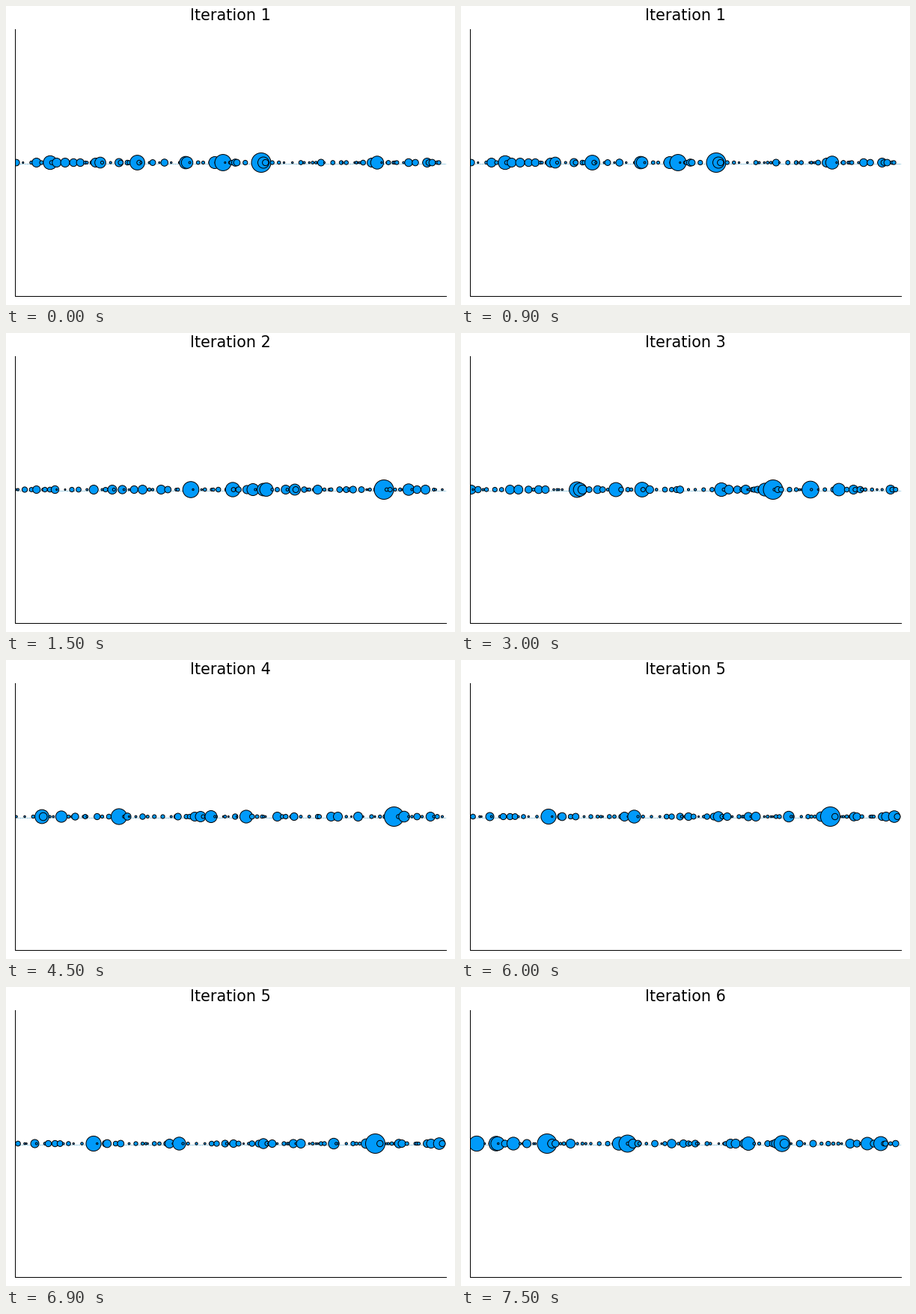
These frames come from a looping animation (600 px wide and 400 px high, 8000 ms). A matplotlib script:

```python
import random

import matplotlib.pyplot as plt
from matplotlib.animation import FuncAnimation
from matplotlib.collections import PatchCollection
from matplotlib.patches import Circle, Rectangle

W, H, DPI = 600, 400, 100
PX = 72 / DPI  # one pixel in points
LEFT, RIGHT, TOP, BOTTOM = 11.5, 587.5, 31, 387.5
MID = 209.5
COUNT = 256
STEP = (RIGHT - LEFT) / COUNT
MAX_RADIUS = 13
HOLD = 3  # ticks per iteration

# Per iteration: how fast radii fall with rank, and the main centres by rank
PEAKS = [
    (0.25, [341, 290, 175.5, 59, 496, 240, 279, 242, 344, 126]),
    (0.27, [505, 247, 303, 348, 344, 330, 538, 386]),
    (0.20, [417, 467, 155, 242, 207, 348, 159, 406, 505]),
    (0.30, [518.5, 151, 48, 321, 274, 74, 532, 260]),
    (0.37, [493.5, 117, 231.5, 579, 438, 344, 481, 568, 525, 384]),
    (0.18, [115, 222.5, 429, 21, 47, 561, 49, 384, 211, 70, 543]),
]

fig = plt.figure(figsize=(W / DPI, H / DPI), dpi=DPI, facecolor="white")
ax = fig.add_axes([0, 0, 1, 1])
ax.set(xlim=(0, W), ylim=(H, 0))
ax.axis("off")

ax.plot([LEFT, LEFT, RIGHT], [TOP, BOTTOM, BOTTOM], color="black", lw=PX, zorder=3)
ax.plot([14, RIGHT], [210.5, 210.5], color="#3d9dc8", lw=PX, zorder=1,
        linestyle=(0, (1, STEP - 1)), dash_capstyle="butt")
title = ax.text(W / 2, 19, "", ha="center", va="baseline",
                family="DejaVu Sans", size=20.8 * PX)


def bubbles(seed, decay, centres):
    """Ranked main bubbles and random small ones, stacked from left to right."""
    rng = random.Random(seed)
    marks = [(x, MAX_RADIUS * rank ** -decay) for rank, x in enumerate(centres, 1)]
    k = 1
    while k < COUNT:
        radius = min(6, 1 + rng.expovariate(1 / 1.8))
        marks.append((LEFT + STEP * k, radius))
        k += rng.randint(1, 5)
    group = PatchCollection([Circle((x, MID), r) for x, r in sorted(marks)],
                            facecolor="#009afa", edgecolor="black",
                            linewidth=PX, zorder=2)
    ax.add_collection(group)
    group.set_clip_path(Rectangle((LEFT, TOP), RIGHT - LEFT, BOTTOM - TOP,
                                  transform=ax.transData))
    return group


groups = [bubbles(seed, *peaks) for seed, peaks in enumerate(PEAKS)]


def update(tick):
    current = tick // HOLD
    title.set_text(f"Iteration {current + 1}")
    for i, group in enumerate(groups):
        group.set_visible(i == current)
    return [title, *groups]


anim = FuncAnimation(fig, update, frames=16, interval=500, repeat=True, repeat_delay=0)
plt.show()
```
